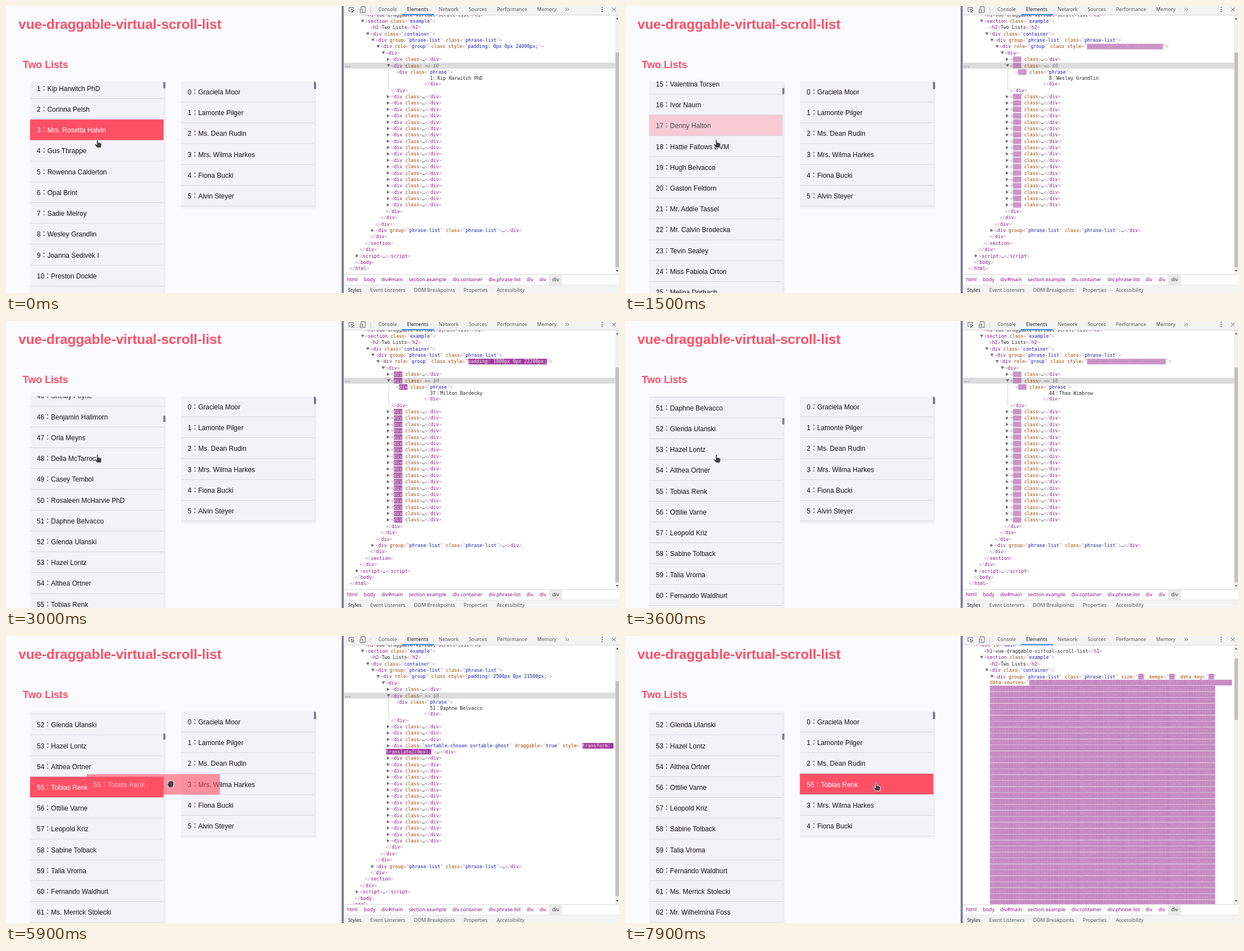
Recreate the animation shown at these times as an HTML page. Size 1093 by 513 pixels, loop 8000 ms.

```html
<!DOCTYPE html>
<html lang="ja">
<head>
<meta charset="utf-8">
<title>Virtual scroll list</title>
<style>
html, body { margin: 0; width: 100%; height: 100%; overflow: hidden; background: #fafaff; }
svg { display: block; }
text { white-space: pre; }
.page { font-family: "Liberation Sans", "Noto Sans CJK JP", sans-serif; font-size: 12px; }
.head { font-weight: bold; fill: #ff5065; }
.ui { font: 8.8px "Noto Sans", sans-serif; fill: #555; }
.code { font-family: "DejaVu Sans Mono", "Noto Sans CJK JP", monospace; font-size: 8.34px; }
</style>
</head>
<body>
<svg width="1093" height="513" viewBox="0 0 1093 513">
  <defs>
    <clipPath id="leftClip"><rect x="42.7" y="135" width="241.8" height="390" rx="4"/></clipPath>
    <clipPath id="rightClip"><rect x="311.7" y="135" width="241.3" height="227" rx="4"/></clipPath>
    <clipPath id="codeClip"><rect x="603" y="16.5" width="483" height="463"/></clipPath>
  </defs>
  <rect width="1093" height="513" fill="#fafaff"/>
  <g class="page">
    <text class="head" x="22.3" y="41" font-size="24.22">vue-draggable-virtual-scroll-list</text>
    <text class="head" x="29.8" y="111.3" font-size="17.86">Two Lists</text>
    <g id="left" clip-path="url(#leftClip)"></g>
    <g id="right" clip-path="url(#rightClip)"></g>
    <g id="drag"></g>
  </g>
  <rect x="598.5" width="4" height="513" fill="#7b7a94"/>
  <rect x="602.5" width="491" height="513" fill="#fff"/>
  <rect x="602.5" width="491" height="16" fill="#f3f3f3"/>
  <path d="M603 16.3H1093" stroke="#ccc" stroke-width=".8"/>
  <rect x="706" y="14.6" width="57" height="1.8" fill="#1a73e8"/>
  <g fill="none" stroke="#666" stroke-width="1">
    <path d="M614 9.5H611.5V2.5H619.5V5M615 5.5L621 8L618 9L617 12ZM618 9L621 12"/>
    <path d="M633 4V1.5H640.5V11.5H637M631.5 5.5H636V12H631.5Z"/>
    <path d="M650.5 2V13" stroke="#ccc"/>
    <path d="M1080.5 3L1087 9.5M1087 3L1080.5 9.5M997.5 3.5L1000 6.2L997.5 9M1001 3.5L1003.5 6.2L1001 9"/>
  </g>
  <g fill="#555"><circle cx="1063" cy="2.5" r="1"/><circle cx="1063" cy="6.2" r="1"/><circle cx="1063" cy="10" r="1"/></g>
  <g id="code" class="code" clip-path="url(#codeClip)"></g>
  <rect x="1086" y="17" width="7" height="463" fill="#f1f1f1"/>
  <rect id="codeThumb" x="1086.5" width="6.5" fill="#c1c1c1"/>
  <path d="M1087.5 24L1089.8 21L1092 24ZM1087.5 472L1089.8 475L1092 472Z" fill="#505050"/>
  <rect x="603" y="480" width="490" height="33" fill="#fff"/>
  <rect x="968" y="480.4" width="23" height="18.3" fill="#eaeaea"/>
  <path d="M603 480H1093M603 499H1093" stroke="#ccc" stroke-width=".8"/>
  <rect x="603" y="499.4" width="490" height="14" fill="#f3f3f3"/>
  <g id="labels" class="ui"></g>
  <g id="cursor"></g>
</svg>
<script>
const LOOP = 8000, ROW = 37.22, LINE = 11.38, WRAP = 10.63, CHAR = 5.0207;
const RED = [255, 80, 101], PLAIN = [244, 242, 249], WHITE = [255, 255, 255], BLACK = [17, 17, 17];
const FLASH = [158, 54, 153];
const INK = { text: [34, 34, 34], tag: [136, 18, 128], attr: [153, 69, 0], value: [26, 26, 166], mark: [168, 148, 166] };

const NAMES = `Ines Wadlow,Kip Harwitch PhD,Corinna Pelsh,Mrs. Rosetta Halvin,Gus Thrappe,Rowenna Calderton,
Opal Brint,Sadie Melroy,Wesley Grandlin,Joanna Sedivek I,Preston Dockle,Odette Farlow,Hollis Brant,Lenora Quisk,
Piers Tolland,Valentina Torsen,Ivor Naum,Denny Halton,Hattie Fallows DVM,Hugh Belvacco,Gaston Feldorn,
Mr. Addie Tassel,Mr. Calvin Brodecka,Tevin Sealey,Miss Fabiola Orton,Melina Dorbach,Curtis Wanwell,Edda Lomhoff,
Rhoda Vintle,Quincy Abelorn,Mr. Tilda Groves,Abner Colwick,Nola Trevane,Floyd Hasker,Miss Petra Lunde,Cyrus Mobley,
Verna Stokely,Milton Bardecky,Greta Olmsen,Dorian Pewter,Lottie Hambel,Ms. Roland Fitch,Sylvie Crandle,Emmett Yorrick,
Thea Wimbrow,Shelby Foyne,Benjamin Hallmorn,Orla Meyns,Della McTarrock,Casey Tembol,Rosaleen McHarvie PhD,
Daphne Belvacco,Glenda Ulanski,Hazel Lontz,Althea Ortner,Tobias Renk,Ottilie Varne,Leopold Kriz,Sabine Tolback,
Talia Vroma,Fernando Waldhurt,Ms. Merrick Stolecki,Mr. Wilhelmina Foss,Perry Dunmore,Ada Rusk`
  .replace(/\n/g, '').split(',').map((name, i) => `${i}：${name}`);
const GUESTS = 'Graciela Moor,Lamonte Pilger,Ms. Dean Rudin,Mrs. Wilma Harkes,Fiona Bucki,Alvin Steyer,Mona Teller'
  .split(',').map((name, i) => `${i}：${name}`);

const HOLDS = [[0, 500], [2400, 3000], [5000, 5600], [6800, 7100]];
const SCROLL = [[500, 0], [700, 70], [1500, 529], [2400, 1560], [3000, 1651], [3700, 1886.7]];
// time, first rendered row, time of the style change if it differs
const RANGES = [[-9999, 0], [1100, 7], [1600, 15], [1850, 22], [2200, 29], [2800, 36, 2950], [3200, 43], [3700, 50]];
const HOVER = {
  3: [[600, 1], [900, 0]],
  17: [[1200, 0], [1300, .8], [1500, .25], [1600, 0]],
  54: [[3750, 0], [3900, 1], [4050, 1], [4300, 0]],
  55: [[4000, 0], [4150, 1], [4300, 1], [4700, 0], [4800, 0], [5000, 1]],
  56: [[6199, 0], [6200, 1], [7200, 1], [7500, 0]]
};
const GUEST_HOVER = [[7200, 0], [7500, 1]];
const HAND = [[3800, 157.5, 238.5], [4100, 200, 262], [4400, 326.5, 280.5], [4600, 300, 278], [5000, 186, 263]];
const FIST = [[5600, 186, 263], [5900, 287, 258], [6200, 381, 258], [6400, 411, 258], [6800, 440, 258]];
const GHOST = [[5600, 43, 252, .6], [5900, 144, 247, .6], [6200, 240, 246, .65], [6400, 271, 245.5, .7], [6800, 301, 245.5, .75]];
const HAND_SHAPE = 'M4 1.5Q4 0 5.3 0T6.6 1.5V5.5Q8 4.8 9 5.8Q10.2 5.4 11 6.5Q13.2 6.4 13 8.8L12 15H5L.8 10Q-.6 8 1.4 7.8L4 9.5Z';
const FIST_SHAPE = 'M2 4Q2 1 4 1.6Q5 0 6.5 1Q8 0 9 1.3Q12 .9 12 4V7.5L10.5 13H4L.6 8.6Q-.4 6 2 5.6Z';

const $ = id => document.getElementById(id);
const escape = s => s.replace(/&/g, '&amp;').replace(/</g, '&lt;');
const mix = (a, b, k) => `rgb(${a.map((v, i) => Math.round(v + (b[i] - v) * k))})`;
const rect = (x, y, w, h, fill) => `<rect x="${x}" y="${y}" width="${w}" height="${h}" fill="${fill}"/>`;
const label = (x, y, s, fill) => `<text x="${x}" y="${y}" fill="${fill}">${escape(s)}</text>`;

function track(t, keys) {
  const next = keys.findIndex(k => k[0] > t);
  if (next === 0) return keys[0].slice(1);
  if (next < 0) return keys[keys.length - 1].slice(1);
  const a = keys[next - 1], b = keys[next], k = (t - a[0]) / (b[0] - a[0]);
  return a.slice(1).map((v, i) => v + (b[i + 1] - v) * k);
}

// CSS "ease" timing curve
function ease(x) {
  let lo = 0, hi = 1;
  for (let i = 0; i < 16; i++) {
    const s = (lo + hi) / 2;
    if (.75 * s * (1 - s) + s ** 3 < x) lo = s; else hi = s;
  }
  return .3 * lo * (1 - lo) ** 2 + 3 * lo * lo * (1 - lo) + lo ** 3;
}
const flash = age => age < 0 || age >= 1400 ? 0 : 1 - ease(age / 1400);

function item(x, y, name, hover) {
  return rect(x - .3, y - .3, 238.1, ROW + .3, mix(PLAIN, RED, hover)) + rect(x, y + ROW - 1, 237.5, 1, '#cbc9d1') +
    label(x + 12, y + 22.9, name, mix(BLACK, WHITE, hover));
}

function lists(t) {
  const moved = t >= 6200, [scroll] = track(t, SCROLL);
  const names = moved ? NAMES.filter((_, i) => i !== 55) : NAMES;
  let out = rect(43, 135, 242, 380, '#efeef3');
  names.forEach((name, i) => {
    const y = 91.65 + i * ROW - scroll, keys = HOVER[parseInt(name)];
    if (y > 95 && y < 513) out += item(43, y, name, keys ? track(t, keys)[0] : 0);
  });
  $('left').innerHTML = out + rect(280.5, 136 + scroll * .0203, 4, 11, '#7b7a94');

  const guests = GUESTS.slice();
  if (moved) guests.splice(3, 0, NAMES[55]);
  $('right').innerHTML = rect(312, 135, 241, 227, '#efeef3') +
    guests.map((name, i) => item(312, 135 + i * ROW, name, moved && i === 3 ? track(t, GUEST_HOVER)[0] : 0)).join('') +
    rect(549, 135, 4, 13.5, '#7b7a94');
}

function pointer(t) {
  const dragging = t >= 5600 && t < 7200;
  const [x, y] = dragging ? track(t, FIST) : t >= 7200 ? [442.5, 262] : track(t, HAND);
  $('cursor').innerHTML = `<path transform="translate(${x} ${y})" d="${dragging ? FIST_SHAPE : HAND_SHAPE}"
    fill="#444" stroke="#fff" stroke-width=".9"/>`;
  const [gx, gy, alpha] = track(t, GHOST);
  $('drag').innerHTML = dragging
    ? `<g opacity="${alpha}">${rect(gx, gy, 237.5, 36.5, `rgb(${RED})`)}${label(gx + 12, gy + 22.7, NAMES[55], '#fff')}</g>` : '';
}

// Splits markup into coloured pieces; a leading * marks a freshly changed piece.
function pieces(src, state) {
  const out = [];
  for (const [part] of src.matchAll(/<\/?|>|="|"|[^<>="]+/g)) {
    if (/^[<>="]/.test(part)) {
      out.push(['mark', part]);
      state = part[0] === '<' ? 'tag' : part === '>' ? 'text' : part === '="' ? 'value' : 'attr';
    } else if (state === 'tag') {
      const [, tag, rest] = part.match(/^(\S+)(.*)$/);
      out.push(['tag', tag]);
      if (rest) out.push(['attr', rest]);
    } else out.push([state, part]);
  }
  return out;
}

function codeLine(x, y, src, alpha = 0, state = 'text') {
  let boxes = '', spans = '', column = 0;
  for (let [kind, s] of pieces(src, state)) {
    const changed = s[0] === '*' && alpha > 0;
    s = s.replace(/^\*/, '');
    if (changed) boxes += `<rect x="${x + column * CHAR}" y="${y - 5}" width="${s.length * CHAR}" height="10" rx="1"
      fill="rgb(${FLASH})" opacity="${alpha}"/>`;
    spans += `<tspan fill="${changed ? mix(INK.tag, WHITE, alpha) : `rgb(${INK[kind]})`}">${escape(s)}</tspan>`;
    column += s.length;
  }
  return boxes + `<text x="${x}" y="${y + 3}">${spans}</text>`;
}

function inspector(t) {
  const dragging = t >= 5800 && t < 6200, moved = t >= 6200, dropped = t >= 7500;
  const [since, start, styled = since] = RANGES.filter(r => r[0] <= t).pop();
  const tagAlpha = flash(t - since), styleAlpha = flash(t - styled);
  let y = moved ? 15.6 : 4.2, out = '';
  const indent = depth => 612.6 + 9.25 * depth;
  const add = (x, src, { arrow, alpha, height = LINE, state } = {}) => {
    const d = arrow === 'open' ? 'h6l-3 5z' : 'v6l5 -3z';
    if (arrow) out += `<path d="M${x - 7.5} ${y - (arrow === 'open' ? 2.5 : 3)}${d}" fill="#6e6e6e"/>`;
    out += codeLine(x, y, src, alpha, state);
    y += height;
  };
  const open = (depth, src, more) => add(indent(depth), src, { arrow: 'open', ...more });
  const shut = (depth, src, more) => add(indent(depth), src, { arrow: 'shut', ...more });
  const leaf = (depth, src, more) => add(indent(depth), src, more);
  const entry = () => shut(8, '<*div class>…</div>', { alpha: tagAlpha });

  open(2, '<div id="main">');
  leaf(3, '<h1>vue-draggable-virtual-scroll-list</h1>');
  open(3, '<section class="example">');
  leaf(4, '<h2>Two Lists</h2>');
  open(4, '<div class="container">');
  if (dropped) {
    const alpha = flash(t - 7600 + 50), pair = '[object Object],';
    open(5, '<div group="phrase-list" class="phrase-list" size="*50" keeps="*20" data-key="*id"', { alpha, height: WRAP });
    add(650.6, `data-sources="*${pair.repeat(4)}[object `, { alpha, height: WRAP, state: 'attr' });
    while (y < 486) add(650.6, `*Object],${pair.repeat(4)}[object `, { alpha, height: WRAP, state: 'value' });
  } else {
    open(5, '<div group="phrase-list" class="phrase-list">');
    open(6, `<div role="group" class style="*padding: ${start * 50}px 0px ${24000 - start * 50}px;">`, { alpha: styleAlpha });
    open(7, '<*div>', { alpha: flash(t - 6200) });
    entry();
    out += rect(603, y - 5.3, 483, 10.6, '#dcdcdc') + `<path d="M682.5 ${y + 6}v39" stroke="#ccc" stroke-width=".8"/>` +
      `<text x="604" y="${y + 2}" font-weight="bold" fill="#555" font-size="7" letter-spacing="-1">...</text>` +
      `<text x="${indent(8) + 11 * CHAR}" y="${y + 3}" fill="#777" font-style="italic"> == $0</text>`;
    open(8, '<*div class>', { alpha: tagAlpha });
    leaf(9, '<*div class="phrase">', { alpha: tagAlpha, height: WRAP });
    add(756, NAMES[start + 1], { height: WRAP });
    add(746, '</div>');
    leaf(8, '</div>');
    for (let i = 2; i < (moved ? 19 : 20); i++) {
      if (dragging && i === 5) {
        const alpha = flash(t - 5850);
        shut(8, '<div class="sortable-chosen sortable-ghost" draggable="true" style="*transform: ', { alpha, height: WRAP });
        add(677.8, '*translateZ(0px);">…</div>', { alpha, state: 'value' });
      } else entry();
    }
    leaf(7, '</div>');
    leaf(6, '</div>');
    leaf(5, '</div>');
    shut(5, '<div group="phrase-list" class="phrase-list">…</div>');
    leaf(4, '</div>');
    leaf(3, '</section>');
    leaf(2, '</div>');
    shut(2, '<script>…<\/script>');
    leaf(1, '</body>');
    leaf(0, '</html>');
  }
  $('code').innerHTML = out;
  const [top, bottom] = dropped ? [40, 150] : moved ? [73, 467] : dragging ? [81, 465] : [83, 467];
  $('codeThumb').setAttribute('y', top);
  $('codeThumb').setAttribute('height', bottom - top);
}

function drawLabels() {
  const bar = (y, fill, entries) => entries.split('|').map(e => {
    const [x, ...words] = e.split(' ');
    return label(+x, y, words.join(' '), fill);
  }).join('');
  $('labels').innerHTML =
    bar(9.3, '#5a5a5a', '664 Console|771.5 Network|825 Sources|875.5 Performance|947 Memory') +
    bar(9.3, '#222', '715 Elements') +
    bar(492, '#881280', '608 html|638 body|669 div#main|718 section.example|796 div.container|860.5 div.phrase-list|928 div|951 div') +
    bar(492, '#333', '974 div') +
    bar(511.2, '#222', '610 Styles') +
    bar(511.2, '#5a5a5a', '649.5 Event Listeners|727.5 DOM Breakpoints|816 Properties|875 Accessibility');
}

let shown = -1;
function frame(now) {
  let t = Math.floor(now % LOOP / 100) * 100;
  const hold = HOLDS.find(([from, to]) => t >= from && t < to);
  if (hold) t = hold[0];
  if (t !== shown) {
    shown = t;
    lists(t);
    pointer(t);
    inspector(t);
  }
  requestAnimationFrame(frame);
}
drawLabels();
frame(0);
</script>
</body>
</html>
```
